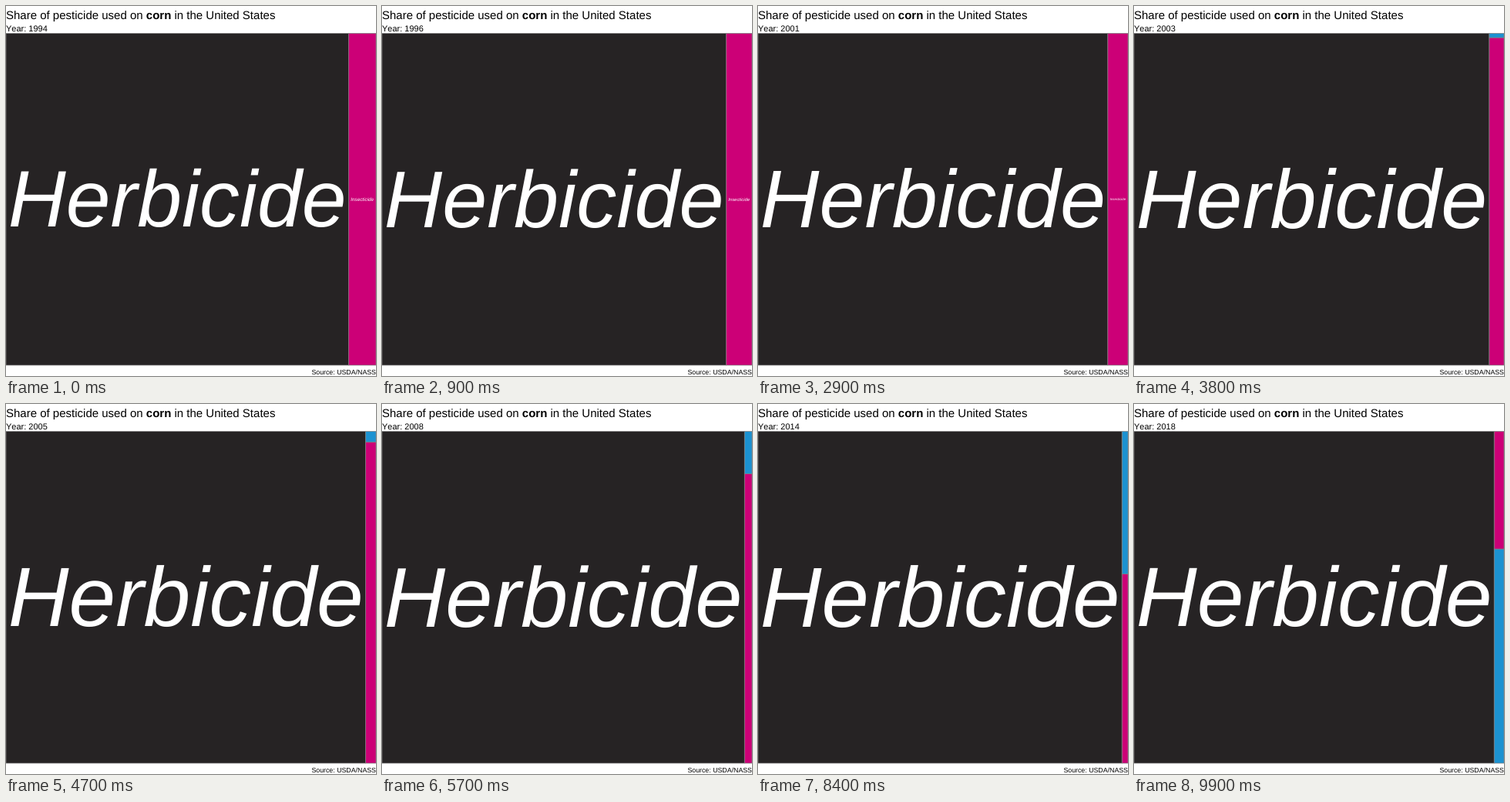
These frames come from a looping animation (480 by 480 pixels, 10000 ms). An HTML page:

```html
<!DOCTYPE html>
<html lang="en">
<head>
<meta charset="utf-8">
<title>Share of pesticide used on corn</title>
<style>
  html, body { margin: 0; width: 100%; height: 100%; overflow: hidden; background: #fff; }
  svg { display: block; width: 100vw; height: 100vh; }
  text {
    font-family: "Liberation Sans", Arial, Helvetica, sans-serif;
    font-kerning: none;
    text-rendering: geometricPrecision;
    white-space: pre;
  }
  rect { stroke: #7f7f7f; stroke-width: .75; }
  .label { fill: #fff; font-style: italic; text-anchor: middle; }
  #herbicide { fill: #262324; }
  #insecticide { fill: #cc0077; }
  #fungicide { fill: #1c92d1; }
</style>
</head>
<body>
<svg viewBox="0 0 480 480">
  <text x="0" y="16.5" font-size="15">Share of pesticide used on <tspan font-weight="bold">corn</tspan> in the United States</text>
  <text id="year" x="0" y="33" font-size="11"></text>
  <rect id="herbicide"/>
  <rect id="insecticide"/>
  <rect id="fungicide"/>
  <text id="herbicideLabel" class="label">Herbicide</text>
  <text id="insecticideLabel" class="label">Insecticide</text>
  <text x="480" y="478" font-size="8.8" text-anchor="end">Source: USDA/NASS</text>
</svg>
<script>
  const LOOP = 10000, STEP = 100, LAST = LOOP / STEP - 1;
  const FIRST_YEAR = 1994, LAST_YEAR = 2018;
  const WIDTH = 480, TOP = 35.5, HEIGHT = 430.5;
  const PADDING = 2.83, MIN_FONT = 4, CAP_HEIGHT = 0.688;
  const FUNGICIDE_START = 2003;

  // [year, percent of all pesticide]
  const insecticide = [[1994, 7.42], [1998, 6.66], [2001, 5.47], [2003, 4.05],
    [2005, 2.87], [2010, 0.9], [2014, 0.92], [2018, 0.94]];
  const fungicide = [[2003, 0.05], [2005, 0.062], [2010, 0.41], [2014, 0.6],
    [2016, 1.12], [2018, 1.71]];

  const el = id => document.getElementById(id);

  function valueAt(points, year) {
    const i = points.findIndex(p => p[0] >= year);
    if (i <= 0) return points[i < 0 ? points.length - 1 : 0][1];
    const [y0, v0] = points[i - 1], [y1, v1] = points[i];
    return v0 + (v1 - v0) * (year - y0) / (y1 - y0);
  }

  function setAttrs(node, attrs) {
    for (const name in attrs) node.setAttribute(name, attrs[name]);
  }

  function placeTile(id, x, y, width, height) {
    setAttrs(el(id), { x, y, width, height, visibility: height > 0 ? "visible" : "hidden" });
  }

  // Grow the label to the tile's width; drop it when it gets too small.
  function fitLabel(id, ems, x, y, width, height) {
    const size = (width - 2 * PADDING) / ems;
    setAttrs(el(id), {
      x: x + width / 2,
      y: y + height / 2 + size * CAP_HEIGHT / 2,
      "font-size": Math.max(size, MIN_FONT),
      visibility: size >= MIN_FONT ? "visible" : "hidden"
    });
  }

  function draw(step) {
    const year = FIRST_YEAR + (LAST_YEAR - FIRST_YEAR) * step / LAST;
    const ins = valueAt(insecticide, year);
    const fun = year < FUNGICIDE_START ? 0 : valueAt(fungicide, year);
    const side = WIDTH * (ins + fun) / 100;
    const main = WIDTH - side;
    const insHeight = HEIGHT * ins / (ins + fun);
    const funHeight = HEIGHT - insHeight;

    // The larger share sits at the bottom of the side column.
    const insTop = ins >= fun ? TOP + funHeight : TOP;
    const funTop = ins >= fun ? TOP : TOP + insHeight;

    el("year").textContent = "Year: " + Math.round(year);
    placeTile("herbicide", 0, TOP, main, HEIGHT);
    placeTile("insecticide", main, insTop, side, insHeight);
    placeTile("fungicide", main, funTop, side, funHeight);
    fitLabel("herbicideLabel", 4.223, 0, TOP, main, HEIGHT);
    fitLabel("insecticideLabel", 4.724, main, insTop, side, insHeight);
  }

  const start = performance.now();
  function tick() {
    const time = (performance.now() - start) % LOOP;
    draw(Math.floor(time / STEP));
    requestAnimationFrame(tick);
  }
  tick();
</script>
</body>
</html>
```
